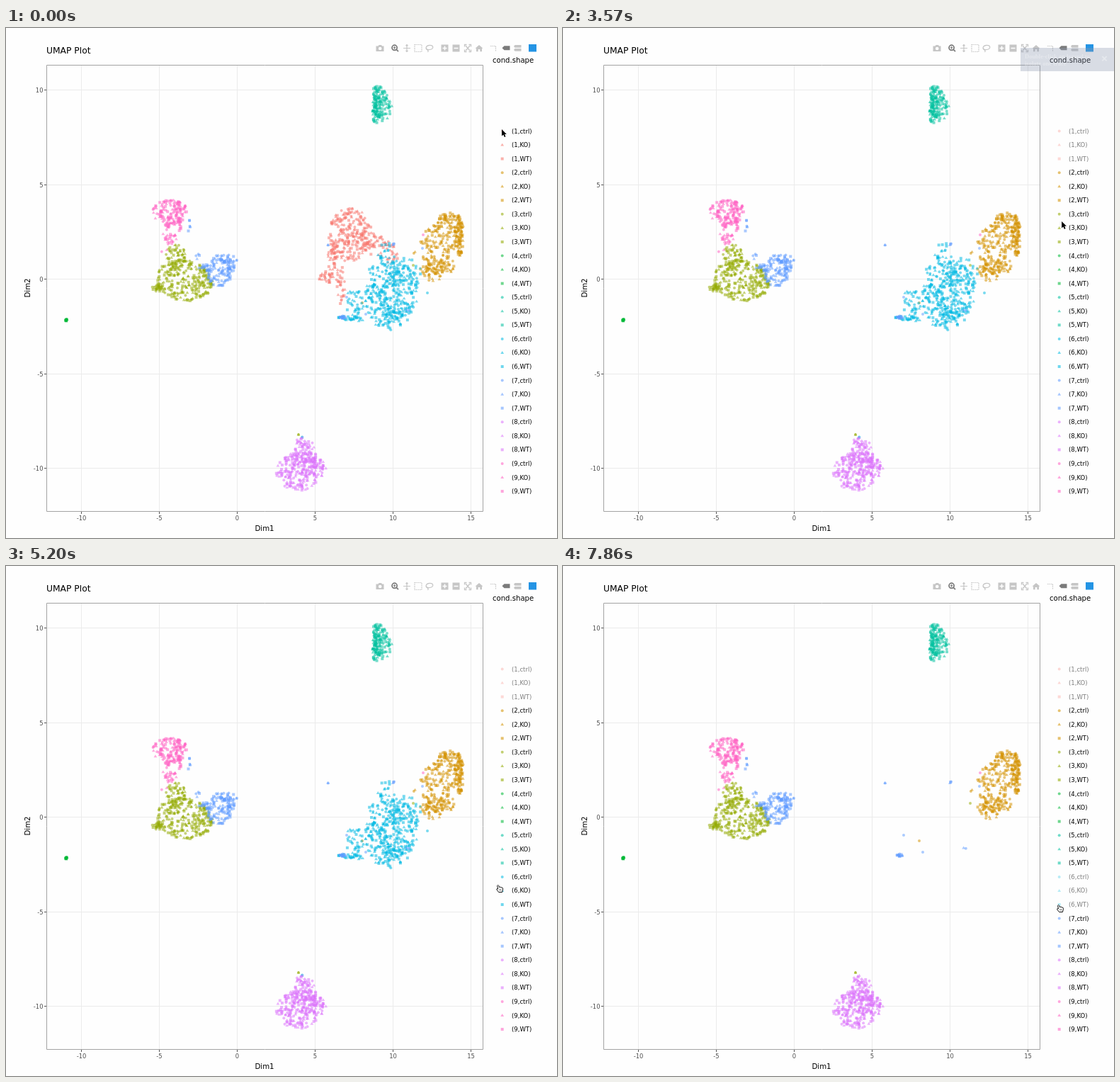
Animation, 778 px wide and 720 px high, one loop 8 s. Source, as an HTML page with a canvas:

```html
<!DOCTYPE html>
<html lang="en">
<head>
<meta charset="utf-8">
<title>UMAP Plot</title>
<style>
html, body { margin: 0; width: 100%; height: 100%; overflow: hidden; background: #fefefe; }
canvas { display: block; }
</style>
</head>
<body>
<canvas id="stage" width="778" height="720"></canvas>
<script>
const ctx = document.getElementById('stage').getContext('2d');
const LOOP = 8000, TICK = 148.3;
const SANS = '"DejaVu Sans", Verdana, sans-serif';
const SERIF = '"Liberation Serif", Times, serif';
const ARIAL = '"Liberation Sans", Arial, sans-serif';
const COLORS = ['#F8766D', '#D39200', '#93AA00', '#00BA38', '#00C19F', '#00B9E3', '#619CFF', '#DB72FB', '#FF61C3'];
const CONDS = ['ctrl', 'KO', 'WT'];

// Trace index (3 * cluster + condition) -> time it is switched off
const HIDE = { 0: 590, 1: 1780, 2: 2680, 15: 5640, 16: 6520, 17: 7860 };

// Pointer stops: arrival, departure, x, y
const STOPS = [
  [0, 740, 700, 143], [1180, 1480, 700, 162], [2080, 2380, 701, 181], [2530, 2530, 702, 195],
  [2980, 3130, 704, 203], [3570, 3570, 707, 270], [4020, 4160, 566, 413], [4460, 4750, 568, 395],
  [5200, 5200, 697, 456], [5340, 5640, 699, 443], [6080, 6380, 699, 461], [7120, LOOP, 702, 483]
];

let seed = 71;
function rand() {
  seed = (seed * 1664525 + 1013904223) % 4294967296;
  return seed / 4294967296;
}

const traces = Array.from({ length: 27 }, () => []);

// Scatters points over ellipses: count, centre, radii, tilt in degrees
function cluster(id, ...blobs) {
  for (const [count, cx, cy, rx = 0, ry = rx, deg = 0] of blobs) {
    const c = Math.cos(deg * Math.PI / 180), s = Math.sin(deg * Math.PI / 180);
    for (let i = 0; i < count; i++) {
      const a = rand() * 2 * Math.PI, r = Math.sqrt(rand());
      const x = rx * r * Math.cos(a), y = ry * r * Math.sin(a);
      traces[3 * (id - 1) + i % 3].push([cx + x * c - y * s, cy + x * s + y * c]);
    }
  }
}

cluster(1, [215, 486, 292, 31, 38], [85, 522, 308, 38, 16, 30], [28, 453, 352, 11, 9],
  [38, 461, 324, 7, 25, 8], [30, 473, 362, 7, 28]);
cluster(2, [135, 623, 289, 22, 29, 15], [80, 640, 292, 6, 30], [110, 609, 338, 25, 18, -25],
  [32, 594, 305, 9, 25], [2, 578, 317, 3], [1, 503, 388]);
cluster(3, [225, 252, 356, 40, 29, 10], [55, 240, 322, 14, 17], [28, 215, 366, 10, 6],
  [30, 273, 358, 19, 22], [2, 413, 574], [1, 575, 335]);
cluster(4, [14, 85.5, 412.5, 1.4]);
cluster(5, [80, 531, 112, 14, 20], [35, 523, 121, 6, 14], [45, 527, 93, 9, 13, -15]);
cluster(6, [215, 544, 376, 38, 49, 15], [70, 533, 357, 26, 28], [45, 562, 350, 26, 25], [26, 537, 320, 12, 17],
  [36, 491, 390, 16, 22], [28, 487, 410, 19, 4, 5], [80, 545, 402, 25, 25], [2, 418, 578, 1], [1, 595, 374]);
cluster(7, [115, 304, 341, 19, 25, 25], [28, 317, 333, 10, 12], [18, 284, 338, 12, 5], [13, 475, 408, 5, 2],
  [6, 258, 279, 3, 9], [4, 271, 323, 3, 5], [2, 454, 306, 2], [3, 547, 306, 2], [2, 567, 398, 2],
  [1, 481, 380], [1, 508, 404], [1, 588, 311]);
cluster(8, [210, 413, 626, 32, 27], [75, 423, 603, 16, 22], [28, 441, 621, 11, 14], [14, 417, 584, 7]);
cluster(9, [130, 232, 260, 25, 17], [48, 235, 285, 13, 22, 10], [2, 228, 315, 9, 3], [1, 589, 292]);

function marker(cond, x, y) {
  ctx.beginPath();
  if (cond === 0) ctx.arc(x, y, 2, 0, 7);
  else if (cond === 1) { ctx.moveTo(x, y - 2.4); ctx.lineTo(x + 2.4, y + 1.5); ctx.lineTo(x - 2.4, y + 1.5); }
  else ctx.rect(x - 2, y - 2, 4, 4);
  ctx.fill();
}

function text(str, x, y, size, color = '#000', align = 'left', family = SANS) {
  ctx.font = size + 'px ' + family;
  ctx.fillStyle = color;
  ctx.textAlign = align;
  ctx.fillText(str, x, y);
}

function stroke(d, color, width = 1) {
  ctx.strokeStyle = color;
  ctx.lineWidth = width;
  ctx.stroke(new Path2D(d));
}

function fill(d, color) {
  ctx.fillStyle = color;
  ctx.fill(new Path2D(d), 'evenodd');
}

function box(x, y, w, h, color) {
  ctx.fillStyle = color;
  ctx.fillRect(x, y, w, h);
}

function axes() {
  for (let v = -10; v <= 15; v += 5) {
    const x = 326.5 + 22 * v;
    stroke(`M${x} 52V682`, '#ebebeb');
    stroke(`M${x} 683V686`, '#555');
    text(v, x, 695, 8.4, '#4d4d4d', 'center');
    if (v > 10) continue;
    const y = Math.round(354 - 26.7 * v) + 0.5;
    stroke(`M57 ${y}H673`, '#ebebeb');
    stroke(`M54 ${y}H57`, '#555');
    text(v, 52.5, y + 3, 8.4, '#4d4d4d', 'right');
  }
  text('UMAP Plot', 57, 36.3, 12.3);
  text('Dim1', 365, 709.5, 10.2, '#000', 'center');
  ctx.save();
  ctx.translate(34, 367);
  ctx.rotate(-Math.PI / 2);
  text('Dim2', 0, 0, 10.2, '#000', 'center');
  ctx.restore();
}

function toolbar() {
  const off = '#c6c6c6', on = '#7b7b7b';
  // camera, zoom, pan
  fill('M522.5 25.5H525.5L526.5 24H530L531 25.5H533.5V33H522.5ZM530.5 29a2.3 2.3 0 1 0-4.6 0a2.3 2.3 0 1 0 4.6 0Z', off);
  stroke('M552.2 27.8a3.6 3.6 0 1 0-7.2 0a3.6 3.6 0 1 0 7.2 0M551.2 30.4L554 33.2', on, 1.7);
  stroke('M546.6 27.8H550.6M548.6 25.8V29.8', on);
  stroke('M561 28.5H571M566 23.5V33.5M564.5 25L566 23.5L567.5 25M564.5 32L566 33.5L567.5 32', off, 1.2);
  // box select, lasso, spike lines
  ctx.setLineDash([1.6, 1]);
  stroke('M577 23.5H587V33.5H577ZM684 25.5H691.5V33.5', off, 1.2);
  ctx.setLineDash([]);
  stroke('M595 31C591.5 29 593 24.5 598 24.3C604 24 604.5 29.5 598.5 30.5C595 31 593.5 30 594.5 29M595 31Q597 32 595.5 34', off, 1.2);
  // zoom in and out
  for (const x of [614.5, 630.5]) {
    box(x, 23.5, 10, 10, off);
    box(x + 2, 27.7, 6, 1.6, '#fefefe');
  }
  box(618.7, 25.5, 1.6, 6, '#fefefe');
  // autoscale, home
  stroke('M647.5 26.5V23.5H650.5M653.5 23.5H656.5V26.5M656.5 30.5V33.5H653.5M650.5 33.5H647.5V30.5M649 25L655 32M655 25L649 32', off, 1.3);
  fill('M662.5 28.8L668 24L673.5 28.8H672V33.2H669.3V30H666.7V33.2H664V28.8Z', off);
  // hover modes, badge
  fill('M700.5 28.3L703.5 25.3H711.5V31.3H703.5Z', on);
  fill('M717 26L718.5 24H727.5V27.7H718.5ZM717 30.8L718.5 29H727.5V32.7H718.5Z', off);
  box(738, 23, 11, 10.5, '#2494e4');
}

function plot(t) {
  ctx.globalAlpha = 0.53;
  traces.forEach((points, i) => {
    if (t >= HIDE[i]) return;
    ctx.fillStyle = COLORS[i / 3 | 0];
    points.forEach(p => marker(i % 3, ...p));
  });
  ctx.globalAlpha = 1;
  stroke('M57.5 52.5H673.5V682.5H57.5Z', '#a3a3a3');
}

function legend(t) {
  text('cond.shape', 687, 49, 10.1);
  traces.forEach((_, i) => {
    const y = 145.5 + 19.56 * i, id = i / 3 | 0, dim = t >= HIDE[i];
    ctx.globalAlpha = dim ? 0.28 : 0.56;
    ctx.fillStyle = COLORS[id];
    marker(i % 3, 700.7, y);
    ctx.globalAlpha = dim ? 0.5 : 1;
    text(`(${id + 1},${CONDS[i % 3]})`, 714, y + 3, 8.5);
  });
  ctx.globalAlpha = 1;
}

function notice(alpha) {
  ctx.globalAlpha = alpha;
  box(646, 28, 132, 33, '#8c97af');
  text('Double-click on legend to', 652, 43, 'bold 8.5', '#fff', 'left', SERIF);
  text('isolate one trace', 652, 52.7, 'bold 8.5', '#fff', 'left', SERIF);
  stroke('M761.3 40L767.7 46.4M767.7 40L761.3 46.4', '#fff', 2);
  ctx.globalAlpha = 1;
}

function hoverLabel() {
  const d = 'M566 386.5L571.5 382.5V357.5H683.5V415.5H571.5V390.5Z';
  fill(d, '#00b9e3');
  stroke(d, '#444', 0.8);
  ['DATA[, 1]: 10.870294571', 'DATA[, 2]: -1.198020e+00', 'KO_TTGTAGCTAGCTCA.1', 'col.legend: 6', 'cond.shape: KO']
    .forEach((line, i) => text(line, 573, 367.3 + 11.2 * i, 8.7, '#444', 'left', ARIAL));
}

function arrow() {
  const d = 'M0 0V9.5L2.2 7.5L3.8 11L5.5 10.2L4 6.9H6.8Z';
  stroke(d, '#fff', 1.4);
  fill(d, '#000');
}

function cross() {
  stroke('M-4 0H4M0 -4V4', '#222');
}

function hand() {
  const d = 'M-1.5 5.5L-4.5 1.5Q-4.5 0-2.5 1L-3.5-3.5Q-2.5-5.8-1.4-3.6L-.8-1.5Q0-2.6 1-1.4Q2-2.1 2.8-.9Q4.4-1.2 4.5 .6L3.5 5.5Z';
  fill(d, '#fff');
  stroke(d, '#111');
  stroke('M-.2 1V3.5M1.6 1V3.5', '#111', 0.6);
}

const clamp = v => Math.max(0, Math.min(1, v));

function pointer(t) {
  const i = STOPS.findLastIndex(s => s[0] <= t);
  const [, leave, x0, y0] = STOPS[i];
  const [arrive, , x1, y1] = STOPS[i + 1] || STOPS[i];
  const k = t > leave ? (t - leave) / (arrive - leave) : 0;
  const x = x0 + (x1 - x0) * k, y = y0 + (y1 - y0) * k;
  ctx.save();
  ctx.translate(x, y);
  (x < 673 ? cross : t < 5000 ? arrow : hand)();
  ctx.restore();
}

function draw(t) {
  box(0, 0, 778, 720, '#fefefe');
  axes();
  toolbar();
  plot(t);
  legend(t);
  notice(0.9 * clamp((t - 440) / 300) * clamp((3760 - t) / 480));
  if (t >= 4460 && t < 4850) hoverLabel();
  pointer(t);
}

const start = performance.now();
let shown = -1;

function frame() {
  const t = (performance.now() - start) % LOOP;
  const tick = Math.floor((t + 8) / TICK);
  if (tick !== shown) {
    shown = tick;
    draw(Math.min(LOOP - 1, tick * TICK + 20));
  }
  requestAnimationFrame(frame);
}
frame();
</script>
</body>
</html>
```
